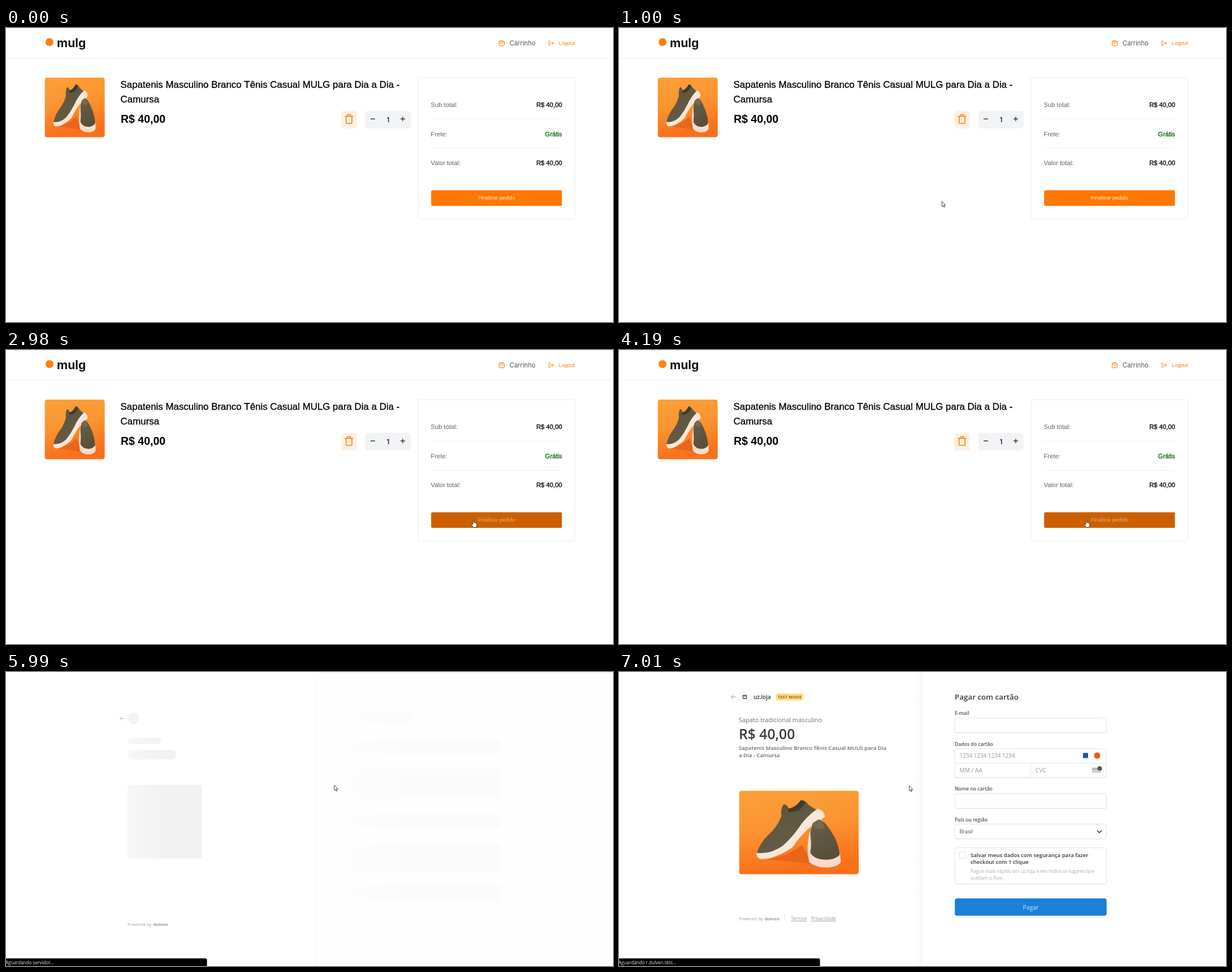
Recreate the animation shown at these times as an HTML page with a canvas. Size 1074 by 521 pixels, loop 7.99 s.

```html
<!DOCTYPE html>
<html lang="pt-BR">
<head>
<meta charset="utf-8">
<title>Checkout</title>
<style>
html, body { margin: 0; width: 100%; height: 100%; overflow: hidden; background: #fff; }
canvas { display: block; }
</style>
</head>
<body>
<canvas id="stage" width="1074" height="521"></canvas>
<script>
const ctx = document.getElementById('stage').getContext('2d');
const LOOP = 7990;
const ARIAL = '"Liberation Sans", Arial, sans-serif';
const GEO = 'Inter, sans-serif';
const UI = '"Open Sans", "Noto Sans", sans-serif';
const ORANGE = '#ff7800';
const SLATE = '#4b5563';

function text(str, x, y, size, color, family = UI, weight = 400, align = 'left') {
  ctx.font = `${weight} ${size}px ${family}`;
  ctx.fillStyle = color;
  ctx.textAlign = align;
  ctx.fillText(str, x, y);
}

// Slightly heavier than regular
function firmText(str, x, y, size, color, align = 'left') {
  text(str, x, y, size, color, ARIAL, 400, align);
  ctx.strokeStyle = color;
  ctx.lineWidth = .3;
  ctx.strokeText(str, x, y);
}

function rect(x, y, w, h, color) {
  ctx.fillStyle = color;
  ctx.fillRect(x, y, w, h);
}

function box(x, y, w, h, r, fill, stroke) {
  ctx.beginPath();
  ctx.roundRect(x, y, w, h, r);
  if (fill) { ctx.fillStyle = fill; ctx.fill(); }
  if (stroke) { ctx.strokeStyle = stroke; ctx.lineWidth = 1; ctx.stroke(); }
}

function disc(x, y, r, color) {
  ctx.beginPath();
  ctx.arc(x, y, r, 0, Math.PI * 2);
  ctx.fillStyle = color;
  ctx.fill();
}

function icon(d, x, y, color, width, fill) {
  const path = new Path2D(d);
  ctx.save();
  ctx.translate(x, y);
  ctx.lineCap = ctx.lineJoin = 'round';
  if (fill) { ctx.fillStyle = fill; ctx.fill(path); }
  if (color) { ctx.strokeStyle = color; ctx.lineWidth = width; ctx.stroke(path); }
  ctx.restore();
}

function shape(d, fill) {
  icon(d, 0, 0, null, 0, fill);
}

function fade(x0, y0, x1, y1, ...colors) {
  const g = ctx.createLinearGradient(x0, y0, x1, y1);
  colors.forEach((c, i) => g.addColorStop(i / (colors.length - 1), c));
  return g;
}

// Product picture, designed on a 212 x 148 field
function photo(x, y, w, h) {
  ctx.save();
  ctx.beginPath();
  ctx.roundRect(x, y, w, h, 4.5);
  ctx.clip();
  ctx.translate(x, y);
  ctx.scale(w / 212, h / 148);
  rect(0, 0, 212, 148, fade(0, 0, 20, 148, '#fba03a', '#fc9430', '#f9701a'));
  shape('M50 122Q84 116 112 96L128 130Q90 124 50 122Z', '#e8651a');
  // Left shoe: upper, opening, sole
  shape('M32 108Q38 92 50 80Q68 64 75 45Q73 34 78 25Q84 22 88 32Q100 30 109 17Q116 15 124 26L140 36' +
    'L124 56L104 79L80 102Q55 117 32 113Z', fade(60, 30, 100, 100, '#5d5540', '#665c45'));
  shape('M86 32Q99 31 109 18Q114 17 117 22Q108 39 88 38Z', '#413b2c');
  shape('M31 110Q56 113 78 97Q94 82 104 68Q118 46 139 32Q151 35 152 46Q138 56 124 66' +
    'Q106 82 95 100Q62 122 38 121Q30 119 31 110Z', '#fbe6d8');
  // Right shoe: sole, upper, opening
  shape('M125 72Q118 98 124 126Q134 136 155 136Q176 135 180 126L179 112L150 96Z', '#f9dccb');
  shape('M130 58Q140 49 151 56Q160 66 169 82Q177 98 178 114Q168 123 152 122Q134 122 126 110' +
    'Q129 94 126 76Z', fade(130, 60, 170, 125, '#665d47', '#554d38'));
  shape('M131 61Q137 50 143 51L152 63Q148 71 138 67Z', '#77694f');
  ctx.restore();
}

function arrow(x, y) {
  icon('M.5.5V9.3L2.5 7.5 4 10.7 5.3 10.1 3.9 7H6.5Z', x, y, '#333', .9, '#fff');
}

function hand(x, y) {
  icon('M3 8V1.5Q4-.2 5 1.5V5Q6 4 7 5.3 8 4.6 8.6 5.8 10 5.4 10 7V10L8.8 13.5H4' +
    'L.7 9Q.4 7.3 1.7 7.2Z', x, y, '#222', .9, '#fff');
}

function forbidden(x, y) {
  disc(x, y, 4.9, '#400');
  disc(x, y, 3.1, '#fff');
  icon('M-2.4-2.4L2.4 2.4', x, y, '#500', 1.6);
}

function header() {
  rect(0, 0, 1072, 1, '#f0f0f0');
  rect(0, 53, 1072, 1, '#f0f0f1');
  disc(77, 25, 7, '#ff7f11');
  text('mulg', 90, 34, 21, '#141414', GEO, 700);
  rect(166, 24, 1, 1, '#ddd');
  icon('M2 .5H8L9.5 2.5V8.5Q9.5 9.5 8.5 9.5H1.5Q.5 9.5.5 8.5V2.5ZM.5 2.7H9.5M3 4.7Q5 7.3 7 4.7',
    872, 22, ORANGE, 1);
  text('Carrinho', 891, 31, 11.2, SLATE, GEO);
  icon('M3 .5H.8V8H3M3.2 4.2H8.3M6.3 2.2L8.3 4.2 6.3 6.2', 960, 22.7, ORANGE, 1);
  text('Logout', 978, 30, 9.33, ORANGE, ARIAL);
}

function product() {
  photo(68.4, 87.7, 106.4, 106);
  firmText('Sapatenis Masculino Branco Tênis Casual MULG para Dia a Dia -', 202.6, 106, 16.9, '#000');
  firmText('Camursa', 202.6, 131.5, 16.9, '#000');
  text('R$ 40,00', 203, 168, 19.5, '#000', ARIAL, 700);
  box(593, 147, 28, 31, 4, '#fff0e2');
  icon('M0 3H14M4 3V1Q4 0 5 0H9Q10 0 10 1V3M1.8 3V14Q1.8 15.5 3.3 15.5H10.7Q12.2 15.5 12.2 14V3',
    600, 153.5, ORANGE, 1.5);
  box(635.5, 147, 80.5, 31, 5, '#f2f3f5');
  icon('M0 0H7M53 0H60M56.5-3.5V3.5', 645.5, 161.2, '#111', 1.2);
  text('1', 676, 166.5, 11.2, '#000', GEO, 500, 'center');
}

function summary(total, fill, label) {
  box(729, 88, 277.5, 250.5, 3, '#fff', '#ececee');
  [['Sub total:', total], ['Frete:', 'Grátis'], ['Valor total:', total]].forEach(([name, value], i) => {
    const y = 140 + i * 51.5;
    text(name, 751.6, y, 11.2, '#5b6270', ARIAL);
    firmText(value, 984, y, 11.3, i === 1 ? '#006400' : '#000', 'right');
    if (i) rect(752, Math.floor(y) - 30, 232, 1, '#f1f1f2');
  });
  box(752.2, 287.4, 231.4, 27.8, 2.5, fill);
  text('Finalizar pedido', 868, 304, 9.33, label, ARIAL, 400, 'center');
}

function cart(hover) {
  header();
  product();
  summary('R$ 40,00', hover ? '#cc6000' : ORANGE, hover ? '#dcae88' : '#ffe8d4');
}

function emptyCart() {
  header();
  text('Sem produto, ir para a página inicial', 288, 100.3, 12.2, SLATE, GEO);
  rect(288, 102, 208, 1, SLATE);
  summary('R$ 0,00', '#ffbb80', '#fff3e8');
}

function status(str) {
  box(-4, 507.4, 359.6, 18, 3, '#000');
  text(str, -1, 518, 8.1, '#e4e4e4');
}

function backArrow(x, y, color) {
  icon('M8.5 0H.5M4-3.5L.5 0 4 3.5', x, y, color, 1);
}

function powered(x, y) {
  text('Powered by', x, y, 7.8, '#a2a2a2');
  text('dulven', x + 46, y, 7.6, '#969696', UI, 700);
}

function skeleton() {
  rect(548, 0, 526, 521, '#fefefe');
  rect(546, 0, 2, 521, '#fbfbfb');
  rect(552, 0, 522, 3, fade(0, 0, 0, 3, '#f0f0f0', '#fefefe'));
  backArrow(201, 82.5, '#bdbdbd');
  disc(225.5, 82.5, 10, '#f2f2f2');
  const grey = fade(215, 0, 275, 0, '#f7f7f7', '#f2f2f2');
  box(215, 116.5, 59.5, 11, 5.5, grey);
  box(215, 138, 86, 17, 8, grey);
  box(215, 200, 131.5, 130.5, 4, grey);
  const pale = fade(610, 0, 710, 0, '#fdfdfd', '#fbfbfb');
  box(610, 72, 110, 20, 10, pale);
  [[120, 25], [172, 52], [251, 26], [304, 51], [376, 31]].forEach(([y, h]) => box(610, y, 266, h, 3, pale));
  powered(215, 450);
}

function field(y, h) {
  box(594, y + 1, 269, h, 4, '#ededed');
  box(594, y + .5, 268.5, h - .5, 4, '#fff', '#e2e2e2');
}

function order() {
  backArrow(198, 44, '#9a9a9a');
  disc(222.5, 44.8, 10.8, '#f0f0f0');
  disc(222.5, 44, 10, '#fff');
  box(218.5, 40.5, 8, 7.5, 1, '#6b6b6b');
  rect(220, 43.5, 5, 2.5, '#fff');
  text('uz.loja', 238, 47.7, 9.8, '#333', UI, 600);
  box(277.5, 38, 49, 12.5, 2, '#ffde92');
  text('TEST MODE', 302, 47, 7.6, '#bb5504', UI, 700, 'center');
  text('Sapato tradicional masculino', 212, 88.6, 10.95, '#707070');
  text('R$ 40,00', 212, 119, 24.7, '#3a3a3a', UI, 600);
  text('Sapatenis Masculino Branco Tênis Casual MULG para Dia', 212, 137.7, 9.6, '#686868', UI, 600);
  text('a Dia - Camursa', 212, 150.8, 9.6, '#686868', UI, 600);
  photo(212.5, 210.3, 211.8, 148.3);
  powered(212, 439.5);
  rect(293, 429, 1, 12, '#e6e6e6');
  text('Termos', 304, 439.5, 8.1, '#959595');
  text('Privacidade', 340, 439.5, 8.1, '#959595');
  rect(304, 441, 28, 1, '#aaa');
  rect(340, 441, 44, 1, '#aaa');
}

function payment() {
  text('Pagar com cartão', 594, 48.6, 13.4, '#3a3a3a', UI, 600);
  [['E-mail', 76], ['Dados do cartão', 130.5], ['Nome no cartão', 210], ['País ou região', 264.5]]
    .forEach(([label, y]) => text(label, 594, y, 8.6, '#505050', UI, 600));
  [[81, 26.5], [135.5, 51.5], [215, 26.5], [269, 26.5], [311, 64.5]].forEach(([y, h]) => field(y, h));

  rect(594, 161, 269, 1, '#e4e4e4');
  rect(728, 161, 1, 26, '#e4e4e4');
  text('1234 1234 1234 1234', 602.5, 152, 9.9, '#9a9a9a');
  text('MM / AA', 602.5, 177.8, 10.2, '#9a9a9a');
  text('CVC', 737, 177.8, 10.2, '#9a9a9a');
  rect(821, 143.5, 9, 9, '#1557a8');
  disc(846, 148, 5.5, '#ee5a1c');
  box(837, 169, 16, 9.5, 1.5, '#cfcfcf');
  rect(837, 171, 16, 2, '#a5a5a5');
  disc(850.5, 171, 4, '#555');

  text('Brasil', 602.5, 286.3, 9.2, '#444');
  icon('M0 0L3.7 3.5 7.4 0', 846.3, 281.2, '#222', 1.4);
  box(602, 318.5, 12, 11.5, 2.5, '#fff', '#dedede');
  text('Salvar meus dados com segurança para fazer', 622, 327.7, 9.6, '#333', UI, 600);
  text('checkout com 1 clique', 622, 340.2, 9.6, '#333', UI, 600);
  text('Pague mais rápido em uz.loja e em todos os lugares que', 622, 355.5, 8.4, '#adadad');
  text('aceitam o Ruvi.', 622, 367.5, 8.4, '#adadad');
  box(594, 401.5, 269, 31, 4, '#e4e8ec');
  box(594.2, 401.2, 268.5, 30.5, 4, '#1a80d9');
  text('Pagar', 728.5, 421, 10.5, '#d3e7f8', UI, 400, 'center');
}

function checkout() {
  rect(522, 0, 15, 521, fade(522, 0, 537, 0, '#fff', '#f7f7f7'));
  order();
  payment();
}

// Each scene holds until its end time
const scenes = [
  [1000, () => cart(false)],
  [1980, () => { cart(false); arrow(571, 307); }],
  [2980, () => { cart(false); arrow(815.5, 328); }],
  [4990, () => { cart(true); hand(823, 301); }],
  [5990, () => { emptyCart(); forbidden(769.7, 309); status('Aguardando servidor...'); }],
  [7010, () => { skeleton(); arrow(580.5, 200.5); status('Aguardando servidor...'); }],
  [LOOP, () => { checkout(); arrow(513, 201.5); status('Aguardando r.dulven.test...'); }]
];

let start = null;
function draw(now) {
  if (start === null) start = now;
  const t = (now - start) % LOOP;
  rect(0, 0, 1074, 521, '#fff');
  scenes.find(([end]) => t < end)[1]();
  requestAnimationFrame(draw);
}
requestAnimationFrame(draw);
</script>
</body>
</html>
```
